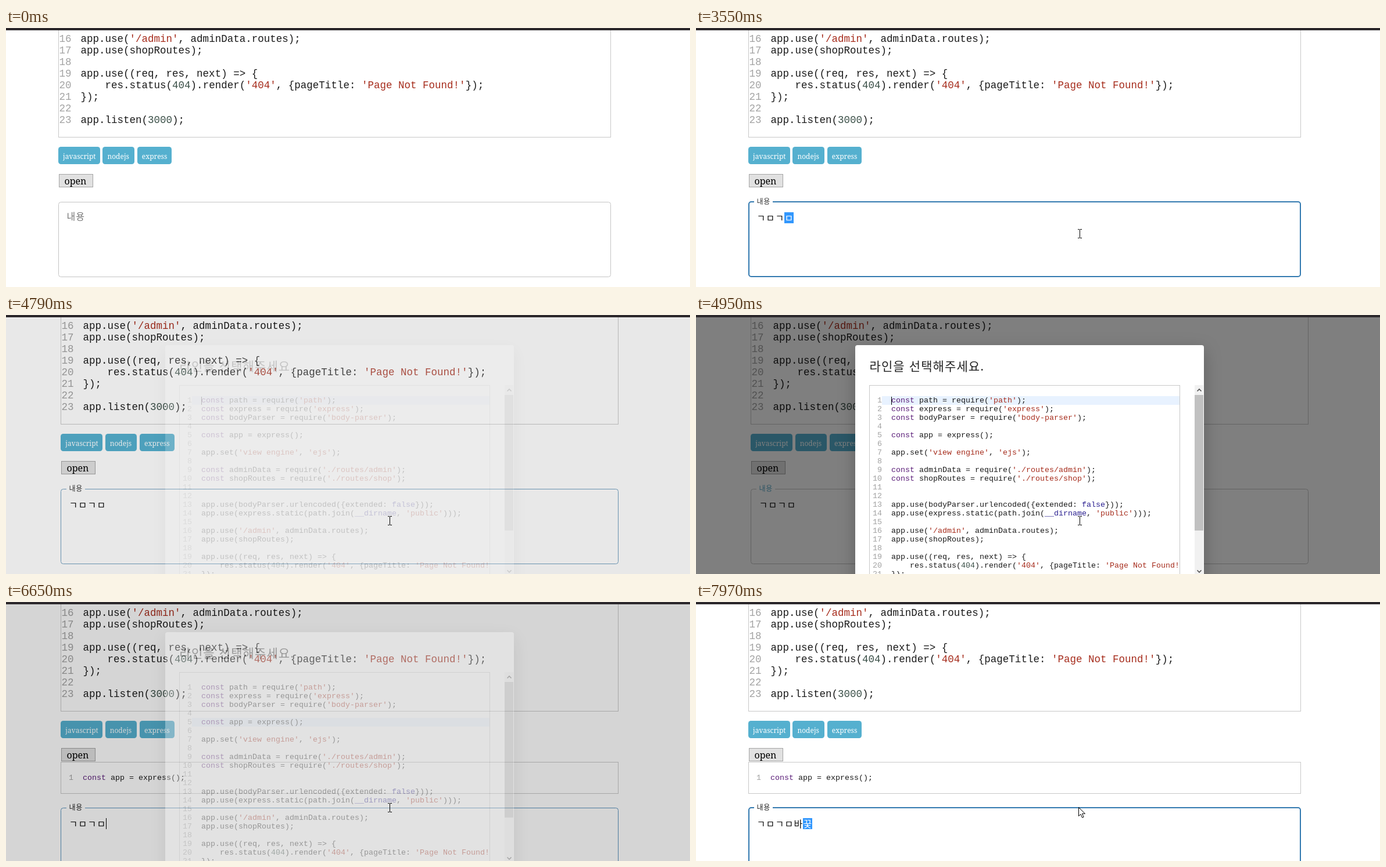
An HTML page that plays this animation: 1177 px wide and 447 px high, repeating every 8 s.

```html
<!DOCTYPE html>
<html lang="ko">
<head>
<meta charset="utf-8">
<title>Code note editor</title>
<style>
  html, body { margin: 0; width: 100%; height: 100%; overflow: hidden; background: #fff; }
  svg { display: block; width: 1177px; height: 447px; }
  text { white-space: pre; }
  .code { font: 17.52px "Liberation Mono", monospace; fill: #1a1a1a; }
  .small { font: 13.333px "Liberation Mono", monospace; fill: #1a1a1a; }
  .num { fill: #a3a3a3; text-anchor: end; }
  .kw { fill: #5a1d78; }
  .str { fill: #a62c1c; }
  .lit { fill: #3a4f47; }
  .atom { fill: #2a1f90; }
  .serif { font-family: "Noto Serif", serif; }
  .ko { font-family: "Noto Sans CJK KR", "Noto Sans CJK", "Noto Sans CJK JP", sans-serif; }
  .typed { font-size: 16px; }
  .paper { filter: drop-shadow(0 9px 14px rgba(0, 0, 0, .25)); }
  .line { fill: none; stroke: #c8c8c8; }
</style>
</head>
<body>
<svg id="stage" viewBox="0 0 1177 447"></svg>
<script>
const LOOP = 8000;
const BLUE = '#337ab0';
const SOURCE = `const path = require('path');
const express = require('express');
const bodyParser = require('body-parser');

const app = express();

app.set('view engine', 'ejs');

const adminData = require('./routes/admin');
const shopRoutes = require('./routes/shop');


app.use(bodyParser.urlencoded({extended: false}));
app.use(express.static(path.join(__dirname, 'public')));

app.use('/admin', adminData.routes);
app.use(shopRoutes);

app.use((req, res, next) => {
    res.status(404).render('404', {pageTitle: 'Page Not Found!'});
});

app.listen(3000);`.split('\n');

// Timelines: [start time, value], each value holds until the next one.
const BORDER = [[0, '#c4c4c4'], [140, '#212121'], [680, BLUE], [4790, '#729fc0'], [4870, '#c4c4c4'],
  [6570, '#5b93bd'], [6725, BLUE]];
const BORDER_WIDTH = [[0, 1], [680, 2], [4790, 1], [6725, 2]];
const LABEL_LIFT = [[0, 0], [680, .2], [760, .8], [840, 1]];
const LABEL_COLOR = [[0, '#757575'], [680, '#333'], [4870, '#5aa9c8'], [6570, '#222']];
const MODAL = [[0, 0], [4790, .18], [4870, .78], [4950, 1], [6570, .93], [6650, .33], [6725, .04], [6800, 0]];
const ACTIVE_ROW = [[0, 0], [5410, 1], [5560, 2], [5790, 3], [6040, 4]];
const ROW_CARET = [[0, true], [5260, false], [5410, true], [6570, false]];
const CARET = [[0, 0], [680, 104], [1140, 0], [1690, 104], [2010, 0], [4030, 174], [4490, 0], [6570, 168], [7110, 0]];
// Committed text, then the syllable still being composed.
const INPUT = [
  [0, ['', '']], [2010, ['', 'ㄱ']], [2940, ['ㄱ', 'ㅁ']], [3090, ['ㄱㅁ', 'ㄱ']],
  [3550, ['ㄱㅁㄱ', 'ㅁ']], [4030, ['ㄱㅁㄱㅁ/', '']], [4790, ['ㄱㅁㄱㅁ', '']],
  [7510, ['ㄱㅁㄱㅁ', 'ㅂ']], [7660, ['ㄱㅁㄱㅁ', '바']], [7810, ['ㄱㅁㄱㅁ바', 'ㄲ']],
  [7890, ['ㄱㅁㄱㅁ바', '꾸']], [7970, ['ㄱㅁㄱㅁ바', '꿎']]
];
const MOUSE = [[0, null], [140, [640, 426]], [215, [649, 396]], [290, [655, 372]], [365, [657, 360]],
  [440, [658, 357]], [990, [659, 356]], [1140, [660, 355]]];

const at = (track, t) => track.reduce((value, [start, next]) => t >= start ? next : value, track[0][1]);

const rect = (x, y, w, h, attrs) => `<rect x="${x}" y="${y}" width="${w}" height="${h}" ${attrs}/>`;
const text = (x, y, cls, body, attrs = '') => `<text x="${x}" y="${y}" class="${cls}" ${attrs}>${body}</text>`;

const TOKEN = /('[^']*')|\b(const)\b|\b(\d+)\b|\b(false|__dirname)\b/g;
const CLASSES = ['str', 'kw', 'lit', 'atom'];
const highlight = line => line.replace(/>/g, '&gt;').replace(TOKEN, (token, ...groups) =>
  `<tspan class="${CLASSES[groups.findIndex(Boolean)]}">${token}</tspan>`);

function listing(first, lines, numberX, codeX, y, pitch, cls) {
  return lines.map((line, i) =>
    text(numberX, y + i * pitch, cls + ' num', first + i) +
    text(codeX, y + i * pitch, cls, highlight(line))).join('');
}

const MAIN_CODE = listing(16, SOURCE.slice(15), 112.6, 128.4, 24, 20, 'code');
const MODAL_CODE = listing(1, SOURCE.slice(0, 21), 320, 336, 151, 15, 'small');
const SNIPPET = listing(1, ['const app = express();'], 112, 128, 307, 15, 'small');

// Box edges snap to whole pixels, as they do in page layout.
function tag(x, w, name) {
  const left = Math.round(x);
  return rect(left, 205, Math.round(x + w) - left, 30, 'rx="4.5" fill="#55b0cf"') +
    text(x + 8, 226, 'serif', name, 'font-size="12" fill="#fff"');
}

const tags = shift => tag(90.1 + shift, 71.8, 'javascript') +
  tag(166.45 + shift, 54.25, 'nodejs') + tag(225.8 + shift, 59.5, 'express');
const BUTTON = rect(91.5, 252.5, 58, 22, 'fill="#e1e1e1" stroke="#a5a5a5"') +
  text(100.5, 270, 'serif', 'open', 'font-size="16"');

function field(t, width) {
  const stroke = at(BORDER_WIDTH, t);
  const lift = at(LABEL_LIFT, t);
  const [done, composing] = at(INPUT, t);
  const caret = at(CARET, t);
  const inset = stroke / 2;
  const top = stroke === 2 ? 300 : 300.5;
  const size = 16 - 4 * lift;
  let out = rect(90 + inset, top, width - stroke, 430 - inset - top,
    `rx="4" fill="none" stroke="${at(BORDER, t)}" stroke-width="${stroke}"`);
  if (lift) out += rect(100, 298, 32, 4, 'fill="#fff"');
  out += text(104.5, 331 - 27.5 * lift, 'ko', '내용',
    `font-size="${size}" letter-spacing="${size * .06}" fill="${at(LABEL_COLOR, t)}"`);
  const glyph = (char, i, fill) => text(104.6 + 16 * i, 333.5, 'ko typed', char, `fill="${fill}"`);
  out += [...done].map((char, i) => glyph(char, i, '#111')).join('');
  if (composing) {
    out += rect(104 + 16 * done.length, 318, 16, 19, 'fill="#3297fd"') + glyph(composing, done.length, '#fff');
  }
  if (caret) out += rect(caret, 318, 1, 19, '');
  return out;
}

function page(t) {
  const wide = t >= 4790 && t < 6800;
  const inserted = t >= 6570;
  const width = wide ? 960 : 951;
  return tags(wide ? 4.25 : 0) + `<g transform="translate(${wide ? 4 : 0} 0)">` +
    rect(90.5, -5.5, width - 1, 194, 'class="line"') + MAIN_CODE + BUTTON +
    (inserted ? rect(90.5, 276.5, width - 1, 54, 'class="line"') + SNIPPET : '') +
    `<g transform="translate(0 ${inserted ? 55 : 0})">${field(t, width)}</g></g>`;
}

function modal(t) {
  const opacity = at(MODAL, t);
  if (!opacity) return '';
  const rowY = 140 + 15 * at(ACTIVE_ROW, t);
  const chevron = (y, dy) => `<path d="M862.5 ${y}l3.5 ${dy}l3.5 ${-dy}" fill="none" stroke="#505050" stroke-width="1.6"/>`;
  return rect(0, 4, 1177, 443, `opacity="${opacity * .5}"`) +
    `<g opacity="${opacity}">` +
    rect(274, 52, 600, 420, 'rx="4" fill="#fff" class="paper"') +
    text(298.5, 96, 'ko', '라인을 선택해주세요.', 'font-size="21" letter-spacing="1.1" fill="#222"') +
    rect(298.5, 121.5, 534, 400, 'class="line"') +
    rect(320, rowY, 512, 15, 'fill="#e8f2ff"') +
    `<g clip-path="url(#editor)">${MODAL_CODE}</g>` +
    (at(ROW_CARET, t) ? rect(336, rowY + 1, 1, 14, '') : '') +
    rect(858, 121, 15, 326, 'fill="#f1f1f1"') + rect(858, 138, 15, 234, 'fill="#c1c1c1"') +
    chevron(131.5, -3.5) + chevron(440.5, 3.5) + '</g>';
}

function mouse(t) {
  const point = at(MOUSE, t);
  if (!point) return '';
  if (t >= 6800) {
    return '<path d="M658.5 354.5v15l3.5-3.3 2.6 6 2.5-1.1-2.6-5.8h5z" fill="#fff" stroke="#000"/>';
  }
  return `<path transform="translate(${point})" d="M-3 -7.5h3m1 0h3M.5 -7v14M-3 7.5h3m1 0h3" fill="none" stroke="#000"/>`;
}

const stage = document.getElementById('stage');
const DEFS = `<defs><clipPath id="editor">${rect(299, 122, 533, 325, '')}</clipPath></defs>`;
let shown = '';

function draw(t) {
  const picture = DEFS + page(t) + modal(t) + rect(0, 0, 1177, 4, 'fill="#2c282c"') + mouse(t);
  if (picture !== shown) stage.innerHTML = shown = picture;
}

const begin = performance.now();
function tick() {
  draw((performance.now() - begin) % LOOP);
  requestAnimationFrame(tick);
}
tick();
</script>
</body>
</html>
```
